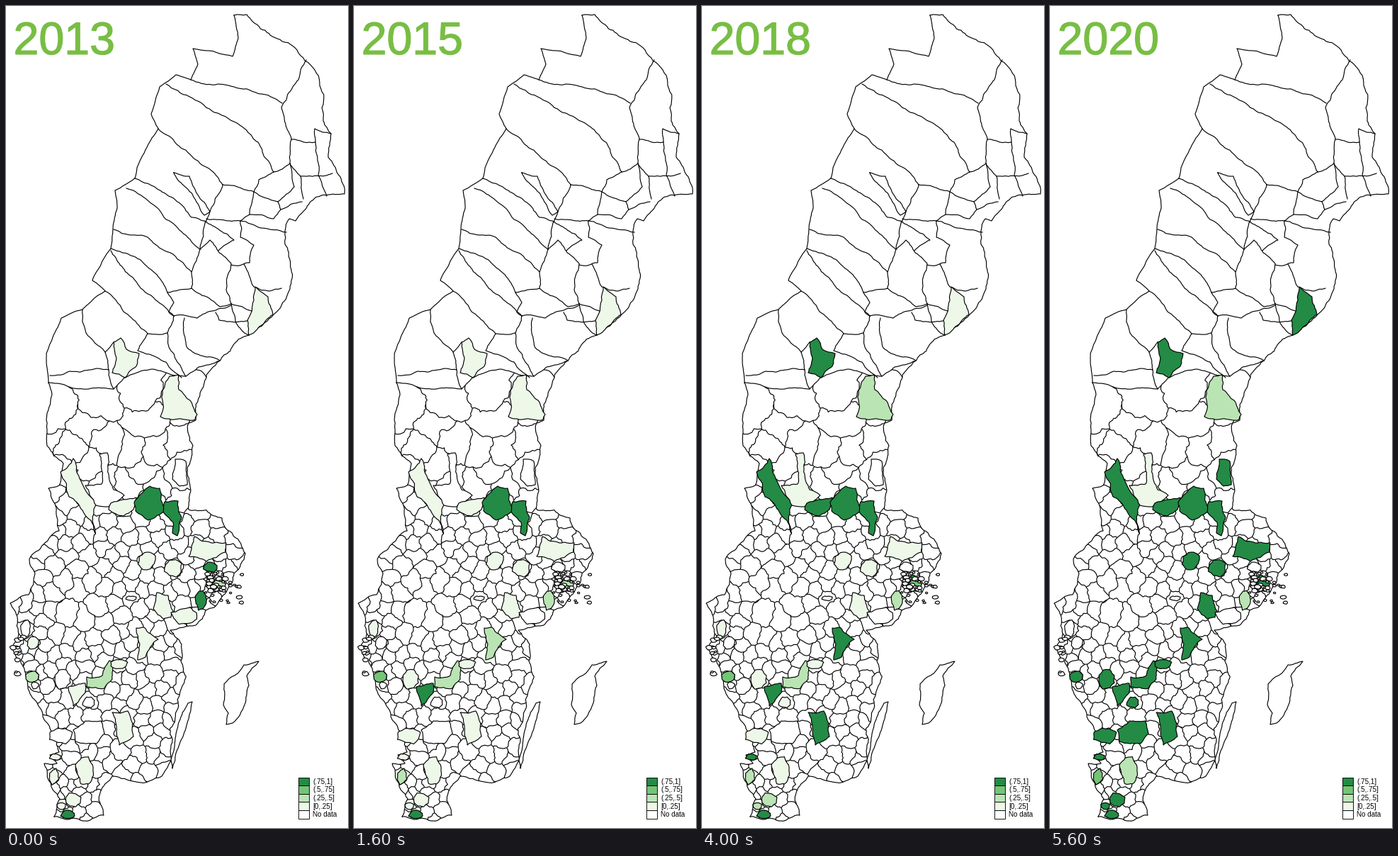
Animation, 483 px wide and 1159 px high, one loop 6.4 s. Source, as a matplotlib script:

```python
import math
import random

import matplotlib.pyplot as plt
import numpy as np
from matplotlib import patheffects
from matplotlib.animation import FuncAnimation
from matplotlib.collections import LineCollection
from matplotlib.patches import Polygon, Rectangle

W, H, DPI = 483, 1159, 100
PX = 72 / DPI
LW = 1.15 * PX
FILLS = ["#ffffff", "#edf8e9", "#bae4b3", "#74c476", "#238b45"]
GREEN = "#78be43"
rng = random.Random(11)

plt.rcParams["font.family"] = "Liberation Sans"
fig = plt.figure(figsize=(W / DPI, H / DPI), dpi=DPI, facecolor="white")
ax = fig.add_axes([0, 0, 1, 1])
ax.set_xlim(0, W)
ax.set_ylim(H, 0)
ax.axis("off")


def pts(*n):
    return np.reshape(np.array(n, float), (-1, 2))


def rough(line, bend):
    """Fractal midpoint displacement; bend is relative to segment length."""
    line = [tuple(p) for p in line]
    for _ in range(5):
        out = []
        for (x0, y0), (x1, y1) in zip(line[:-1], line[1:]):
            out.append((x0, y0))
            if math.hypot(x1 - x0, y1 - y0) > 5:
                off = rng.uniform(-bend, bend)
                out.append(((x0 + x1) / 2 - (y1 - y0) * off,
                            (y0 + y1) / 2 + (x1 - x0) * off))
        line = out + [line[-1]]
    return np.array(line)


def stroke(line, bend):
    line = rough(line, bend)
    ax.plot(*line.T, color="black", lw=LW, solid_joinstyle="round", zorder=2)
    return line


def area(shape, bend=0.1):
    ring = rough(np.vstack([shape, shape[:1]]), bend)
    return ax.add_patch(Polygon(ring, fc="white", ec="black", lw=LW, zorder=3,
                                joinstyle="round"))


def lump(x, y, w, h):
    """Irregular closed shape of roughly w by h around a centre."""
    turn = math.tau * (np.arange(8) + 0.5) / 8
    far = np.array([rng.uniform(0.85, 1.2) for _ in turn]) / 2
    return np.column_stack([x + w * far * np.cos(turn),
                            y + h * far * np.sin(turn)])


# Outer border, coasts and the line between the northern and southern parts
border = pts(322, 13, 328, 45, 320, 71, 264, 60, 271, 82, 261, 104, 240, 97,
             217, 114, 205, 152, 215, 173, 185, 228, 182, 243, 154, 260,
             157, 285, 148, 342, 122, 387, 140, 402, 108, 428, 78, 440,
             57, 490, 60, 531)
gulf = pts(322, 13, 340, 12, 383, 46, 411, 62, 436, 90, 448, 162, 459, 180,
           455, 213, 478, 265, 437, 270, 409, 303, 400, 300, 394, 336,
           404, 384, 377, 436, 343, 464, 328, 470, 302, 500)
west = pts(60, 531, 65, 548, 58, 620, 81, 645, 75, 676, 60, 680, 75, 740,
           33, 780, 41, 800, 32, 830, 6, 842, 18, 885, 9, 905, 28, 945,
           36, 973, 75, 1052, 62, 1056, 72, 1068, 54, 1068, 66, 1105,
           76, 1118, 68, 1143)
east = pts(68, 1143, 85, 1147, 138, 1141, 131, 1120, 150, 1086, 220, 1086,
           232, 1050, 243, 990, 248, 900, 232, 880, 268, 873, 282, 852,
           294, 848, 313, 822, 322, 800, 338, 772, 305, 722, 258, 710,
           256, 660, 264, 620, 258, 588, 268, 584, 268, 562, 302, 500)
inland = pts(302, 500, 272, 509, 254, 522, 206, 512, 166, 525, 152, 540,
             95, 539, 60, 531)

stroke(border, 0.04)
stroke(gulf, 0.1)
ring = np.vstack([stroke(west, 0.1), stroke(east, 0.12), stroke(inland, 0.06)])

# Long northern district lines
for line in [
    pts(261, 104, 322, 114, 390, 137),
    pts(424, 76, 413, 104, 389, 143, 403, 188, 401, 222, 378, 234),
    pts(403, 188, 437, 192, 436, 173, 459, 180),
    pts(437, 192, 441, 238, 453, 268),
    pts(401, 222, 416, 240, 461, 236),
    pts(416, 240, 420, 272),
    pts(226, 110, 291, 148, 356, 192, 378, 234),
    pts(215, 173, 241, 195, 290, 232, 306, 252),
    pts(306, 252, 350, 262, 357, 245, 378, 234),
    pts(350, 262, 344, 294, 331, 303),
    pts(350, 262, 384, 276, 407, 255, 401, 222),
    pts(344, 294, 378, 300, 388, 287, 384, 276),
    pts(388, 287, 418, 276),
    pts(182, 243, 226, 265, 262, 298, 283, 304),
    pts(237, 235, 259, 240, 270, 265, 288, 290, 280, 295, 263, 265, 237, 235),
    pts(306, 252, 288, 290, 281, 306, 274, 343),
    pts(170, 257, 226, 301, 274, 343),
    pts(152, 315, 200, 326, 236, 350, 262, 375, 274, 343),
    pts(148, 342, 191, 359, 228, 404, 262, 398, 262, 375),
    pts(148, 345, 178, 382, 207, 410, 237, 437),
    pts(228, 404, 237, 418, 230, 432, 237, 437),
    pts(274, 343, 288, 330, 318, 363, 311, 400, 318, 420),
    pts(262, 398, 302, 424, 318, 420),
    pts(237, 437, 270, 440, 318, 422),
    pts(281, 304, 322, 330, 300, 345),
    pts(283, 300, 331, 303, 331, 326, 350, 337, 344, 362, 318, 365),
    pts(331, 303, 360, 313, 396, 319),
    pts(336, 364, 350, 396, 372, 402, 389, 398),
    pts(318, 420, 347, 430),
    pts(296, 432, 301, 443, 343, 444),
    pts(318, 420, 325, 447, 343, 464),
    pts(252, 440, 256, 482, 302, 500),
    pts(140, 402, 166, 431, 200, 462, 228, 461, 237, 437),
    pts(108, 428, 113, 461, 140, 488, 152, 474),
    pts(200, 462, 186, 486, 226, 502, 248, 524),
    pts(228, 461, 230, 481, 254, 522),
    pts(62, 521, 90, 515, 145, 513, 140, 488),
    pts(145, 513, 152, 540),
]:
    stroke(line, 0.08)

# Shaded districts: one level per year, then the shape
DISTRICTS = [
    ("11111114", pts(352, 396, 370, 410, 377, 435, 343, 464, 341, 443, 350, 415)),
    ("11111444", pts(152, 474, 162, 468, 170, 484, 188, 490, 184, 508, 168, 524,
                     150, 517, 156, 497)),
    ("11111222", pts(231, 522, 243, 520, 244, 541, 270, 576, 267, 583, 218, 579,
                     221, 542)),
    ("11111444", pts(95, 638, 106, 670, 127, 698, 126, 743, 108, 711, 89, 692,
                     77, 657)),
    ("00001111", pts(132, 632, 143, 630, 152, 682, 167, 690, 145, 706, 127, 704,
                     112, 676, 135, 674)),
    ("11114444", pts(148, 701, 184, 693, 180, 710, 166, 719, 145, 710)),
    ("44444444", pts(181, 700, 203, 677, 217, 680, 226, 711, 201, 725, 183, 712)),
    ("44444444", pts(224, 699, 243, 698, 248, 721, 242, 747, 235, 743, 236, 728,
                     222, 713)),
    ("00000004", pts(239, 639, 254, 642, 256, 675, 245, 677, 235, 667)),
    ("11111114", pts(266, 748, 290, 757, 311, 757, 310, 770, 283, 783, 258, 776)),
    ("11111144", pts(213, 827, 229, 831, 236, 853, 233, 862, 222, 864, 208, 850)),
    ("11224444", pts(184, 877, 195, 876, 215, 893, 197, 918, 186, 922)),
    ("22222244", pts(114, 946, 136, 944, 146, 923, 153, 926, 150, 949, 139, 962,
                     114, 960)),
    ("11444444", pts(88, 960, 112, 955, 112, 968, 95, 987)),
    ("11111444", pts(150, 996, 172, 994, 180, 1030, 160, 1042, 156, 1016)),
    ("00000004", pts(95, 1021, 112, 1008, 134, 1008, 139, 1026, 128, 1040,
                     98, 1037)),
    ("40000000", lump(289, 791, 22, 14)),
    ("44222222", lump(275, 837, 16, 29)),
    ("11010000", lump(252, 860, 36, 22)),
    ("11111144", lump(199, 781, 23, 26)),
    ("11111124", lump(235, 792, 24, 26)),
    ("11111111", lump(176, 835, 15, 7)),
    ("11111114", lump(160, 928, 22, 13)),
    ("00111114", lump(80, 949, 24, 28)),
    ("00001114", lump(117, 982, 17, 16)),
    ("22332344", lump(37, 946, 20, 16)),
    ("00000040", lump(41, 958, 11, 9)),
    ("11000000", lump(38, 898, 16, 18)),
    ("00111100", lump(28, 879, 14, 25)),
    ("01111114", lump(78, 1029, 30, 23)),
    ("11111444", lump(69, 1059, 15, 9)),
    ("11222233", lump(68, 1086, 13, 22)),
    ("11111122", lump(111, 1077, 25, 36)),
    ("11122234", lump(78, 1128, 12, 11)),
    ("11111224", lump(94, 1120, 22, 19)),
    ("44444444", lump(88, 1140, 21, 11)),
    ("22222334", lump(300, 818, 20, 16)),
    ("00000444", lump(298, 805, 7, 6)),
]
patches = [(levels, area(shape)) for levels, shape in DISTRICTS]

# White southern districts: nearest-seat cells, smaller towards the big cities
CROWDS = [(296, 815, 28, 0.65), (20, 920, 38, 0.4), (80, 1110, 40, 0.35)]
LAKE = (95, 845, 35, -0.6)


def spacing(x, y):
    gap = 16 + 0.15 * max(0, 745 - y)
    for cx, cy, r, squeeze in CROWDS + [LAKE]:
        gap *= 1 - squeeze * math.exp(-((x - cx) ** 2 + (y - cy) ** 2) / r ** 2)
    return gap


def scatter_seats(land, seats):
    for _ in range(14000):
        p = rng.uniform(0, 345), rng.uniform(500, 1150)
        gap = spacing(*p)
        if (land.contains_point(p)
                and np.hypot(*(np.array(seats) - p).T).min() > gap):
            seats.append(p)
    return np.array(seats)


def cell_edges(sites):
    """Borders between nearest-seat cells, as segments."""
    for i, p in enumerate(sites):
        rel = sites - p
        sq = (rel ** 2).sum(1)
        for j in range(i + 1, len(sites)):
            if sq[j] > 110 ** 2:
                continue
            mid = rel[j] / 2
            along = np.array([-rel[j][1], rel[j][0]]) / math.sqrt(sq[j])
            a, b = 2 * rel @ along, sq - 2 * rel @ mid
            up, down = a > 1e-9, a < -1e-9
            hi = (b[up] / a[up]).min(initial=120)
            lo = (b[down] / a[down]).max(initial=-120)
            if lo < hi:
                yield np.array([p + mid + lo * along, p + mid + hi * along])


mainland = ax.add_patch(Polygon(ring, fc="none", ec="none"))
centres = [tuple(shape.mean(0)) for _, shape in DISTRICTS]
seats = scatter_seats(mainland.get_path(), centres)
cells = ax.add_collection(
    LineCollection([rough(e, 0.22) for e in cell_edges(seats)],
                   colors="black", linewidths=LW, zorder=1))
cells.set_clip_path(mainland)

# Islands
area(pts(357, 924, 336, 929, 308, 956, 307, 985, 314, 997, 311, 1013, 320, 1011,
         337, 985, 343, 958, 340, 945), 0.08)
area(pts(263, 981, 250, 1030, 235, 1075, 233, 1063, 244, 1010, 257, 983), 0.05)
for count, x, y, dx, dy, size in [(30, 308, 820, 26, 22, 5),
                                  (24, 297, 815, 13, 10, 6),
                                  (10, 17, 915, 8, 30, 6)]:
    for _ in range(count):
        d = size * rng.uniform(0.5, 1.3)
        area(lump(x + rng.uniform(-dx, dx), y + rng.uniform(-dy, dy),
                  1.2 * d, 0.8 * d))

# Legend and year
for k, label in enumerate(["(.75,1]", "(.5,.75]", "(.25,.5]", "[0,.25]", "No data"]):
    y = 1087.5 + 11.6 * k
    ax.add_patch(Rectangle((412.5, y), 15, 11.6, fc=FILLS[4 - k], ec="black",
                           lw=0.9 * PX))
    ax.text(433, y + 9.2, label, size=9.9 * PX, va="baseline")
year = ax.text(10.5, 68, "2013", size=64.5 * PX, color=GREEN, va="baseline")
year.set_path_effects([patheffects.withStroke(linewidth=1.2 * PX,
                                              foreground=GREEN)])


def update(i):
    year.set_text(str(2013 + i))
    for levels, patch in patches:
        patch.set_facecolor(FILLS[int(levels[i])])
    return [year]


anim = FuncAnimation(fig, update, frames=8, interval=800, repeat=True,
                     repeat_delay=0)
plt.show()
```
